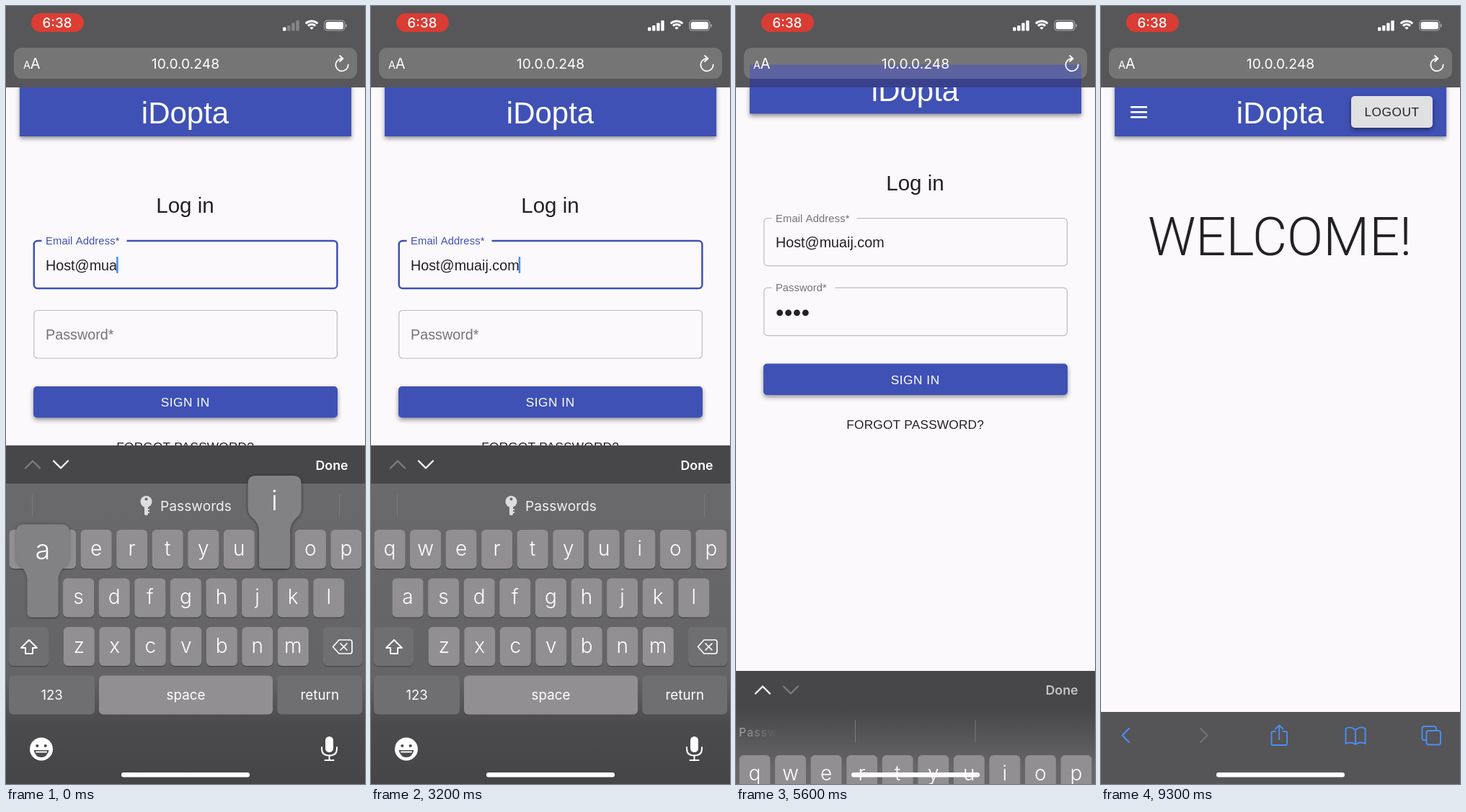
An HTML page with a canvas for the animation above (9400 ms loop, 498 by 1080 pixels).

```html
<!DOCTYPE html>
<html lang="en">
<head>
<meta charset="utf-8">
<title>Log in on a phone</title>
<style>
  html, body { margin: 0; height: 100%; overflow: hidden; background: #fbf9fc; }
  canvas { display: block; }
</style>
</head>
<body>
<canvas id="stage" width="498" height="1080"></canvas>
<script>
const ctx = document.getElementById('stage').getContext('2d');
const LOOP = 9400;
const SANS = '"Liberation Sans", Arial, sans-serif';
const UI = 'Inter, sans-serif';
const PAGE = '#fbf9fc', BLUE = '#3f51b5', INK = '#222124', LINK = '#4c8ef7';
const BRAND = 'iDopta';
const EMAIL = 'Host@muaij.com';

// When each email character after the first eight appears.
const TYPED = [60, 300, 1300, 2150, 2500, 2800];
const DOTS = [3950, 4250, 4600, 4900];
// Key bubbles: key, start, end
const TAPS = [['a', -100, 90], ['i', -60, 170], ['l', 260, 400], ['.', 1240, 1390],
              ['c', 2100, 2250], ['o', 2440, 2590], ['m', 2740, 2890]];
const SYMBOLS = [800, 1700];
const NEXT = 3250, DONE = 5500, TAP = 6300, LOADING = 6360, WELCOME = 8500;

const ramp = (t, start, length) => Math.min(1, Math.max(0, (t - start) / length));
const smooth = u => (1 - Math.cos(Math.PI * u)) / 2;
const easeOut = u => 1 - (1 - u) ** 3;

function text(str, x, y, size, color, { weight = 400, font = SANS, align = 'left', spacing = 0 } = {}) {
  ctx.font = `${weight} ${size}px ${font}`;
  ctx.letterSpacing = spacing + 'px';
  ctx.textAlign = align;
  ctx.fillStyle = color;
  ctx.fillText(str, x, y);
  return ctx.measureText(str).width;
}

const label = (str, x, y, size, color, weight = 400) =>
  text(str, x, y, size, color, { weight, font: UI, align: 'center' });

function rect(x, y, w, h, color, r = 0) {
  ctx.fillStyle = color;
  ctx.beginPath();
  ctx.roundRect(x, y, w, h, r);
  ctx.fill();
}

function disc(x, y, r, color) {
  ctx.fillStyle = color;
  ctx.beginPath();
  ctx.arc(x, y, r, 0, 7);
  ctx.fill();
}

function raised(x, y, w, h, color, r) {
  ctx.save();
  ctx.shadowColor = 'rgba(0,0,0,.42)';
  ctx.shadowBlur = 6;
  ctx.shadowOffsetY = 3;
  rect(x, y, w, h, color, r);
  ctx.restore();
}

function stroke(path, color, width) {
  ctx.strokeStyle = color;
  ctx.lineWidth = width;
  ctx.lineCap = ctx.lineJoin = 'round';
  ctx.stroke(new Path2D(path));
}

function shifted(dy, draw) {
  ctx.save();
  ctx.translate(0, dy);
  draw();
  ctx.restore();
}

function field(y, h, focused, notch) {
  ctx.strokeStyle = focused ? BLUE : '#bebcc0';
  ctx.lineWidth = focused ? 2.5 : 1.2;
  ctx.beginPath();
  ctx.roundRect(38.8, y, 420.6, h, 5);
  ctx.stroke();
  if (notch) rect(49.5, y - 3, notch, 6, PAGE);
}

function header() {
  raised(19, 103, 460, 78, BLUE);
  text(BRAND, 248.5, 163, 42, '#fff', { align: 'center' });
}

function loginPage(t) {
  const onEmail = t < NEXT, onPassword = t >= NEXT && t < DONE;
  const dots = DOTS.filter(at => t >= at).length;
  header();
  text('Log in', 248.5, 287, 29.6, INK, { align: 'center' });

  field(326, 66, onEmail, 118);
  text('Email Address*', 55, 331, 14.8, onEmail ? BLUE : '#757478', { spacing: .1 });
  const typed = EMAIL.slice(0, 8 + TYPED.filter(at => t >= at).length);
  const width = text(typed, 55, 366.5, 19.75, INK);
  if (onEmail) rect(54 + width, 348, 2.6, 23, LINK, 1);

  const shrink = smooth(ramp(t, NEXT, 200));
  field(422.5, 66.5, onPassword, 88 * shrink);
  text('Password*', 55, 463 - 36 * shrink, 19.75 - 4.95 * shrink, onPassword ? BLUE : '#757478');
  for (let i = 0; i < dots; i++) disc(60.7 + 11.9 * i, 457.3, 4.4, INK);
  if (onPassword) rect(54.8 + 11.9 * dots, 444, 2.4, 23, LINK, 1);

  raised(38, 528, 422, 43.5, BLUE, 5);
  if (t > TAP) {
    const fade = 1 - ramp(t, TAP + 150, 550);
    ctx.save();
    ctx.beginPath();
    ctx.roundRect(38, 528, 422, 43.5, 5);
    ctx.clip();
    disc(341, 544, 40 + 270 * smooth(ramp(t, TAP + 100, 450)), `rgba(255,255,255,${.17 * fade})`);
    ctx.restore();
  }
  text('SIGN IN', 248.7, 556, 17.3, '#fff', { align: 'center', spacing: .5 });
  text('FORGOT PASSWORD?', 248.7, 618, 17.3, INK, { align: 'center', spacing: .18 });
}

function welcomePage() {
  header();
  for (const y of [139, 146, 153]) rect(41, y, 23, 2.6, '#fff');
  raised(347, 125, 113, 44, '#e0dfe1', 5);
  text('LOGOUT', 403.5, 153, 17.3, INK, { align: 'center', spacing: .5 });
  text('WELCOME!', 248, 346, 74, INK, { weight: 300, font: 'Roboto, sans-serif', align: 'center' });
}

function loader(t) {
  const fade = smooth(ramp(t, LOADING - 40, 225));
  rect(0, 113, 498, 867, `rgba(0,0,0,${.5 * fade})`);
  if (t < LOADING) return;
  const p = (t - LOADING) / 1400 % 1;
  const e = smooth(p * 2 % 1);
  const offset = p < .5 ? 15 * e : 15 + 110 * e;
  const length = Math.min(p < .5 ? 1 + 99 * e : 100, 126.9 - offset);
  const start = p * 2 * Math.PI + offset / 20.2;
  ctx.strokeStyle = `rgba(255,255,255,${fade})`;
  ctx.lineWidth = 4.4;
  ctx.lineCap = 'butt';
  ctx.beginPath();
  ctx.arc(249, 546.5, 22.7, start, start + length / 20.2);
  ctx.stroke();
}

function toolbar() {
  rect(0, 980, 498, 100, '#555456');
  stroke('M39 1003 L29.5 1012.5 L39 1022', LINK, 2.2);
  stroke('M138 1003 L147.5 1012.5 L138 1022', '#737275', 2.2);
  stroke('M242 1007 H238.5 Q236.5 1007 236.5 1009 V1024 Q236.5 1026 238.5 1026 H256 Q258 1026 258 1024 V1009 Q258 1007 256 1007 H252.5 M247.2 1018 V998.5 M242 1003.5 L247.2 998.5 L252.4 1003.5', LINK, 1.9);
  stroke('M353 1005 Q346 999 339.5 1003 V1024 Q346 1020.5 353 1025 Q360 1020.5 366.5 1024 V1003 Q360 999 353 1005 V1025', LINK, 1.9);
  stroke('M451 1019 H448 Q445.5 1019 445.5 1016.5 V1003 Q445.5 1000 448.5 1000 H462 Q465 1000 465 1003 V1006 M454.5 1006 H468 Q471 1006 471 1009 V1022 Q471 1025.5 468 1025.5 H454.5 Q451.5 1025.5 451.5 1022 V1009 Q451.5 1006 454.5 1006Z', LINK, 1.9);
}

function topBar(t, scroll) {
  rect(0, 0, 498, 113, '#575658');
  if (scroll > 0) {
    const far = ramp(scroll, 32, 62);
    ctx.save();
    ctx.beginPath();
    ctx.rect(0, 0, 498, 113);
    ctx.clip();
    ctx.filter = `blur(${16 * far}px)`;
    ctx.globalAlpha = .85 - .4 * far;
    rect(19, 113 - scroll, 460, 68, '#343e94');
    ctx.restore();
  }
  rect(11, 58, 476, 43, 'rgba(255,255,255,.18)', 11);
  label('10.0.0.248', 249, 87, 19.3, '#fff');
  text('A', 24, 87, 14.5, '#fff', { font: UI });
  text('A', 33.8, 87, 20, '#fff', { font: UI });
  stroke('M466 73 A8.7 8.7 0 1 0 474.7 81.5 M463 69 L467.5 73 L463 77', '#fff', 1.8);

  const glow = Math.max(0, Math.cos((t - 6400) * Math.PI / 1000)) ** 2;
  rect(35, 10, 73, 26, `rgb(${217 + 38 * glow},${60 + 6 * glow},${51 + 4 * glow})`, 13);
  label('6:38', 71, 29.5, 18.7, '#fff', 500);

  const bars = t < 700 ? 1 : t < 1300 ? 2 : t < 2700 ? 3 : 4;
  [5, 7.5, 11, 14.5].forEach((h, i) => rect(384 + 6.1 * i, 34.5 - h, 4.4, h, i < bars ? '#fff' : '#868587', 1));

  ctx.strokeStyle = '#fff';
  ctx.lineWidth = 3;
  ctx.lineCap = 'butt';
  for (const r of [12, 7.4, 2.2]) {
    ctx.beginPath();
    ctx.arc(424, 33, r, -2.33, -.81);
    ctx.stroke();
  }
  ctx.strokeStyle = '#a5a4a6';
  ctx.lineWidth = 1.2;
  ctx.beginPath();
  ctx.roundRect(441.8, 20.2, 28, 13.8, 4);
  ctx.stroke();
  rect(443.7, 22, 24.3, 10.2, '#fff', 2.5);
  rect(471, 25, 1.6, 4.5, '#a5a4a6', 1);
}

function accessoryBar(t) {
  const onEmail = t < NEXT;
  rect(0, 610, 498, 53, '#474648');
  stroke('M27 641.5 L37 631.5 L47 641.5', onEmail ? '#7d7c7e' : '#fff', 2.3);
  stroke('M66 631.5 L76 641.5 L86 631.5', onEmail ? '#fff' : '#7d7c7e', 2.3);
  label('Done', 452, 643.5, 17.8, t > DONE - 100 ? '#c4c3c5' : '#fff', 600);
}

function key(cx, y, w, str, size = 28, color = '#918f92') {
  rect(cx - w / 2, y + 1.5, w, 54, '#4c4b4d', 6);
  rect(cx - w / 2, y, w, 54, color, 6);
  if (str) label(str, cx, y + (size > 20 ? 35.5 : 33), size, '#fff', size > 20 ? 300 : 400);
}

function bubble(cx, y, str) {
  const top = y - 75;
  const fill = ctx.createLinearGradient(0, top, 0, y + 54);
  fill.addColorStop(0, '#7b7a7c');
  fill.addColorStop(1, '#8c8b8d');
  ctx.save();
  ctx.translate(cx, top);
  ctx.shadowColor = 'rgba(0,0,0,.3)';
  ctx.shadowBlur = 4;
  ctx.fillStyle = fill;
  ctx.translate(0, -top);
  ctx.translate(0, top);
  ctx.fillStyle = '#828183';
  ctx.fill(new Path2D('M-26 0 H26 Q37 0 37 11 V45 Q37 53 31 58 Q21.5 66 21.5 77 V123 Q21.5 129 15.5 129 H-15.5 Q-21.5 129 -21.5 123 V77 Q-21.5 66 -31 58 Q-37 53 -37 45 V11 Q-37 0 -26 0Z'));
  ctx.restore();
  label(str, cx, top + 48, 38, '#fff', 300);
}

// Rows of keys: characters, first centre, step, top, width
const LETTER_ROWS = [['qwertyuiop', 26, 49.55, 727, 43], ['asdfghjkl', 51, 49.6, 794.5, 43], ['zxcvbnm', 101.3, 49.5, 862, 43]];
const SYMBOL_ROWS = [['1234567890', 26, 49.55, 727, 43], ['-/:;()$&@"', 26, 49.55, 794.5, 43], [".,?!'", 110, 69.5, 862, 63]];

function suggestions(leaving) {
  const dividers = leaving ? [165, 331.5] : [36, 462];
  for (const x of dividers) rect(x, 678, 1, 31, '#7a797b');
  if (leaving) {
    const fade = ctx.createLinearGradient(4, 0, 58, 0);
    fade.addColorStop(0, 'rgba(255,255,255,.5)');
    fade.addColorStop(1, 'rgba(255,255,255,0)');
    text('Passw', 4, 701, 16, fade, { font: UI, spacing: 1 });
    return;
  }
  disc(194.5, 688, 8, '#dddcde');
  rect(192, 694, 5, 13, '#dddcde', 2);
  rect(196, 698, 3, 2, '#dddcde');
  rect(196, 702, 3, 2, '#dddcde');
  disc(194.5, 684.5, 2, '#6a696b');
  text('Passwords', 214, 701, 19.2, '#f0eff1', { font: UI });
}

function keyboard(t) {
  const leaving = t >= DONE;
  const symbols = t >= SYMBOLS[0] && t < SYMBOLS[1];
  const rows = symbols ? SYMBOL_ROWS : LETTER_ROWS;
  const back = ctx.createLinearGradient(0, 663, 0, 1080);
  [[0, leaving ? '#474648' : '#6a696b'], [.2, '#676668'], [.64, '#646365'], [.8, '#4b4a4c'], [1, '#454446']]
    .forEach(([at, color]) => back.addColorStop(at, color));
  rect(0, 663, 498, 417, back);
  suggestions(leaving);

  for (const [chars, x, step, y, w] of rows)
    [...chars].forEach((c, i) => key(x + step * i, y, w, c));

  const dark = '#6f6e70';
  key(31.5, 862, 55, symbols ? '#+=' : '', 17, dark);
  if (!symbols) stroke('M32 880 L43 891 H37 V899 H27 V891 H21Z', '#fff', 1.9);
  key(467, 862, 54, '', 17, dark);
  stroke('M462 880 H477 Q480 880 480 883 V896 Q480 899 477 899 H462 L453.5 889.5Z M464 885 L473 894 M473 885 L464 894', '#fff', 1.7);
  key(63.5, 929.5, 119, symbols ? 'ABC' : '123', 18.5, dark);
  key(249.5, 929.5, 241, 'space', 18.8);
  key(435.3, 929.5, 118, 'return', 18.8, dark);

  disc(49, 1031.5, 16, '#fff');
  disc(43.3, 1027, 2.1, '#4a494b');
  disc(54.7, 1027, 2.1, '#4a494b');
  ctx.fillStyle = '#4a494b';
  ctx.fill(new Path2D('M38.5 1033 H59.5 Q57 1043 49 1043 Q41 1043 38.5 1033Z'));
  stroke('M42 1035.5 H56', '#fff', 2);
  rect(443, 1014, 11, 22, '#fff', 5.5);
  stroke('M438 1029 V1031 Q438 1040.5 448.5 1040.5 Q459 1040.5 459 1031 V1029 M448.5 1041 V1047 M442.5 1047 H454.5', '#fff', 2);

  for (const [c, from, to] of TAPS) {
    if (t < from || t >= to) continue;
    for (const [chars, x, step, y] of rows) {
      const i = chars.indexOf(c);
      if (i >= 0) bubble(x + step * i, y, c);
    }
  }
}

function draw(t) {
  const leave = easeOut(ramp(t, DONE, 330));
  const scroll = 94 * smooth(ramp(t, NEXT, 250)) * (1 - leave);
  rect(0, 0, 498, 1080, PAGE);
  if (t < WELCOME) shifted(-scroll, () => loginPage(t));
  else welcomePage();
  if (t > LOADING - 40 && t < WELCOME) loader(t);
  toolbar();
  topBar(t, scroll);
  if (leave < 1) shifted(470 * leave, () => {
    if (t < NEXT + 50 || t >= DONE) keyboard(t);
    accessoryBar(t);
    if (t < NEXT + 50) TAPS.filter(([c, a, b]) => c === 'i' && t >= a && t < b).forEach(() => bubble(372.5, 727, 'i'));
  });
  rect(160, 1064, 178, 6.5, '#fff', 3.3);
}

function frame(now) {
  draw(now % LOOP);
  requestAnimationFrame(frame);
}
requestAnimationFrame(frame);
</script>
</body>
</html>
```
